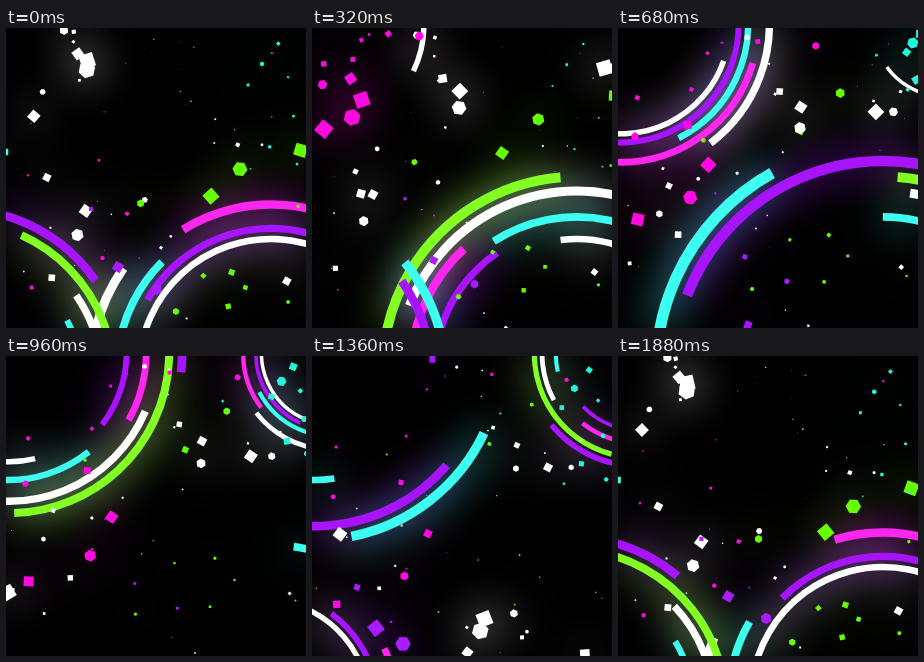
Write an HTML page with a canvas that moves like this. It is 300 by 300 pixels and loops after 1920 ms.

```html
<!DOCTYPE html>
<html lang="en">
<head>
<meta charset="utf-8">
<title>Neon rings</title>
<style>
html, body { margin: 0; width: 100%; height: 100%; overflow: hidden; background: #000; }
canvas { display: block; width: 300px; height: 300px; }
</style>
</head>
<body>
<canvas id="stage" width="300" height="300"></canvas>
<script>
const LOOP = 1920, STEP = 40, SIZE = 300;
const WHITE = '#fff', PURPLE = '#a814ff', CYAN = '#3cfff2', MAGENTA = '#ff26f0', LIME = '#84ff24';
const stage = document.getElementById('stage').getContext('2d');
const layer = document.createElement('canvas');
layer.width = layer.height = SIZE;
const ctx = layer.getContext('2d');
const mod = (a, n) => ((a % n) + n) % n;
const toRad = deg => deg * Math.PI / 180;

let seed = 29;
const random = (min = 0, max = 1) => {
  seed = seed * 16807 % 2147483647;
  return min + (max - min) * seed / 2147483647;
};

// Four copies of one firework; shards fly into the visible quarter around `aim`
const groups = {
  right: { x: 265, y: 343, scale: 1, delay: 0, turn: 0, aim: -115 },
  top: { x: 3, y: -3, scale: .824, delay: 600, turn: 168, aim: 45 },
  corner: { x: 326, y: -2, scale: .533, delay: 930, turn: 276, aim: 145 },
  left: { x: -49, y: 350, scale: .806, delay: 1420, turn: 74, aim: -48 }
};

// Inner to outer. `enter` and `leave` are when head and tail pass the middle
// angle; the head keeps its speed, the tail slows to rest `reach` degrees on.
const MIDDLE = -120, SPEED = .375, EASE = 300;
const rings = [
  { color: WHITE, dir: 1, enter: -219, leave: 190, reach: 65 },
  { color: PURPLE, dir: -1, enter: -80, leave: 297, reach: 55 },
  { color: CYAN, dir: 1, enter: 40, leave: 338, reach: 44 },
  { color: MAGENTA, dir: -1, enter: -5, leave: 248, reach: 60 },
  { color: WHITE, dir: 1, enter: 67, leave: 449, reach: 72 },
  { color: LIME, dir: 1, enter: 253, leave: 554, reach: 100 },
  { color: PURPLE, dir: 1, enter: 471, leave: 783, reach: 95 },
  { color: CYAN, dir: 1, enter: 678, leave: 805, reach: 140 }
];

// `lead` holds the resting places of the biggest shards
const bursts = [
  { from: 'right', start: 1120, color: WHITE, count: 8, lead: [[43, 151], [33, 180]] },
  { from: 'right', start: 1420, color: '#66ff00', count: 9, lead: [[176, 84], [219, 44], [309, 16]] },
  { from: 'top', start: 1710, color: WHITE, count: 8, lead: [[211, 92], [210, 116]] },
  { from: 'top', start: 100, color: '#ff0ae0', count: 9, lead: [[123, 189], [98, 234], [26, 264]] },
  { from: 'corner', start: 430, color: '#22f5da', count: 9, lead: [] },
  { from: 'corner', start: 130, color: WHITE, count: 3, lead: [[230, 119]] },
  { from: 'left', start: 620, color: WHITE, count: 4, lead: [[46, 138]] },
  { from: 'left', start: 920, color: '#a81cff', count: 4, lead: [[131, 226], [174, 251]] }
];

for (const burst of bursts) {
  const home = groups[burst.from];
  burst.shards = burst.lead.map(([x, y]) => ({ x, y, size: 17 }));
  for (let i = 0; i < burst.count; i++) {
    const angle = toRad(home.aim + random(-42, 42));
    const far = home.scale * random(90, 330);
    burst.shards.push({
      x: home.x + far * Math.cos(angle),
      y: home.y + far * Math.sin(angle),
      size: 3 + 9 * random() ** 1.5
    });
  }
}

function drawRings(group, now) {
  const t = mod(now - group.delay + 500, LOOP) - 500;
  if (t > 1340) return;
  rings.forEach(({ color, dir, enter, leave, reach }, i) => {
    // Degrees past the middle, along the ring's own direction
    const head = Math.min(SPEED * (t - enter), 180);
    const tail = Math.max(reach * (1 - Math.exp((leave - t) / EASE)), -150);
    if (head <= tail) return;
    const angle = past => toRad(MIDDLE + group.turn + dir * past);
    const radius = 132 * 1.0805 ** i * group.scale;
    ctx.beginPath();
    ctx.arc(group.x, group.y, radius, angle(tail), angle(head), dir < 0);
    ctx.strokeStyle = color;
    ctx.lineWidth = radius * .05;
    ctx.stroke();
  });
}

function drawShard(x, y, size, sides, angle) {
  const r = size * (sides === 4 ? .64 : .56);
  ctx.beginPath();
  for (let k = 0; k < sides; k++) {
    const a = angle + k * 2 * Math.PI / sides;
    ctx.lineTo(x + r * Math.cos(a), y + r * Math.sin(a));
  }
  ctx.fill();
}

function drawBurst(burst, age) {
  const life = 1 - age / 2400;
  if (life <= 0) return;
  const home = groups[burst.from];
  const p = 1 - Math.exp(-age / 445);
  ctx.fillStyle = burst.color;
  burst.shards.forEach(({ x, y, size }, i) => {
    const spin = 1 + i * 1.3 + p * (i % 2 ? 1.4 : -1.4);
    drawShard(home.x + (x - home.x) * p, home.y + (y - home.y) * p,
      size * life, i % 3 === 1 ? 6 : 4, spin);
  });
}

function draw(now) {
  ctx.clearRect(0, 0, SIZE, SIZE);
  Object.values(groups).forEach(group => drawRings(group, now));
  for (const burst of bursts) {
    // Shards outlive one loop, so the previous burst is still around
    const age = mod(now - burst.start, LOOP);
    drawBurst(burst, age + LOOP);
    drawBurst(burst, age);
  }
  stage.fillStyle = '#000';
  stage.fillRect(0, 0, SIZE, SIZE);
  stage.save();
  stage.globalCompositeOperation = 'lighter';
  stage.globalAlpha = .9;
  stage.filter = 'blur(20px)';
  stage.drawImage(layer, 0, 0);
  stage.restore();
  stage.drawImage(layer, 0, 0);
}

const begin = performance.now();
let shown = -1;
function tick() {
  const now = Math.floor(mod(performance.now() - begin, LOOP) / STEP) * STEP;
  if (now !== shown) draw(shown = now);
  requestAnimationFrame(tick);
}
tick();
</script>
</body>
</html>
```
